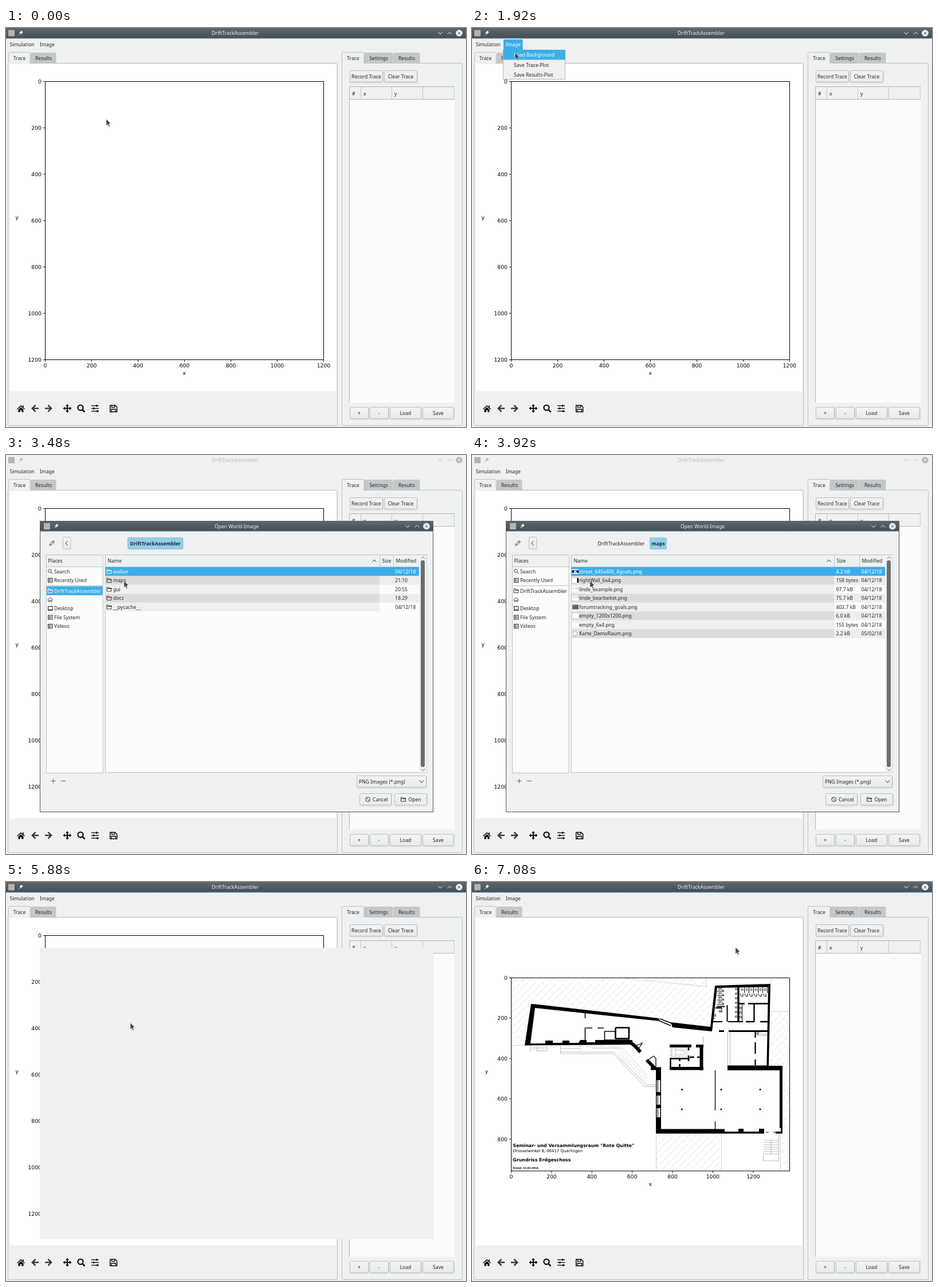
Animation of 803 by 697 pixels, one loop 8.12 s. Source, as an HTML page:

```html
<!DOCTYPE html>
<html lang="en">
<head>
<meta charset="utf-8">
<title>DriftTrackAssembler</title>
<style>
html, body { margin: 0; width: 100%; height: 100%; overflow: hidden; background: #eff0f1; }
svg { display: block; width: 803px; height: 697px; }
text { font: 8.6px "Noto Sans", "Open Sans", sans-serif; fill: #232629; white-space: pre; }
.plot text { font: 9.25px "DejaVu Sans", sans-serif; fill: #000; }
.plot .head { font: bold 7.83px "DejaVu Sans", sans-serif; }
.plot .addr { font-size: 6.95px; }
.plot .tiny { font: bold 4.3px "DejaVu Sans", sans-serif; }
</style>
</head>
<body>
<svg id="stage" viewBox="0 0 803 697" xmlns="http://www.w3.org/2000/svg"></svg>
<script>
const LOOP = 8120;
const APP = 'DriftTrackAssembler';
const BG = '#eff0f1', INK = '#232629', EDGE = '#bcc0c2', BLUE = '#3daee9', VIEW = '#fcfcfc';

const range = n => [...Array(n).keys()];
const rect = (x, y, w, h, fill, stroke = 'none', rx = 0) =>
  `<rect x="${x}" y="${y}" width="${w}" height="${h}" fill="${fill}" stroke="${stroke}" rx="${rx}"/>`;
const path = (d, stroke = INK, width = 1, fill = 'none', extra = '') =>
  `<path d="${d}" stroke="${stroke}" stroke-width="${width}" fill="${fill}" ${extra}/>`;
const solid = (d, fill = '#000') => path(d, 'none', 0, fill);
const disc = (x, y, r, fill, stroke = 'none', w = 1) =>
  `<circle cx="${x}" cy="${y}" r="${r}" fill="${fill}" stroke="${stroke}" stroke-width="${w}"/>`;
const text = (x, y, s, fill = '', anchor = 'start', extra = '') =>
  `<text x="${x}" y="${y}" text-anchor="${anchor}" ${fill && `style="fill:${fill}"`} ${extra}>${s}</text>`;
const group = (id, body, extra = '') => `<g id="${id}" ${extra}>${body}</g>`;

function button(x, y, w, h, label, fill = 'url(#btn)') {
  return rect(x + .5, y + 1, w, h, 'none', '#d3d5d7', 2) + rect(x + .5, y + .5, w - 1, h - 1, fill, '#b9bdbf', 2)
    + text(x + w / 2, y + h / 2 + 3, label, '', 'middle');
}

const chevron = (x, y, s, dy, color = INK) => path(`M${x - s} ${y - dy}L${x} ${y + dy}L${x + s} ${y - dy}`, color);

// Title bar contents; x and y are the top left corner of the window
function titleItems(x, y, w, label, color, hole, middle) {
  const r = x + w, m = y + 9;
  return rect(x + 4, y + 3.5, 11, 11, '#b8b3ae')
    + path(`M${x + 22} ${m + 3.5}l3-3`, color) + solid(`M${x + 23} ${m - 1.5}l2-.6 1.8-2.4 3 3-2.4 1.8-.6 2z`, color)
    + text(middle, y + 12.2, label, color, 'middle')
    + chevron(r - 45, m, 3.8, 2, color) + chevron(r - 28.5, m, 3.8, -2, color)
    + disc(r - 12, m, 5.8, color) + path(`M${r - 14.3} ${m - 2.3}l4.6 4.6m0-4.6l-4.6 4.6`, hole);
}
const titleBack = (x, y, w) => rect(x, y, w, 18, 'url(#title)') + rect(x, y + 17.5, w, 1, '#3b8fc0');

function tab(x, w, label, on) {
  const y = on ? 42.5 : 43.5;
  return path(`M${x + .5} 61.5V${y + 2}q0-2 2-2H${x + w - 2}q2 0 2 2V61.5`, on ? EDGE : '#c2c5c6', 1, on ? BG : '#c5c8c9')
    + text(x + w / 2 + .5, 55.5, label, '', 'middle');
}

function toolbar() {
  const dark = '#3b3b3b';
  let s = path('M19.6 665.8L26 660l6.4 5.8', '#000', 1.5) + rect(29, 659.5, 1.8, 3, '#000')
    + solid('M21.6 666.4L26 662.4l4.4 4v4.6h-3.1v-3.4h-2.6v3.4h-3.1z')
    + path('M51.5 658.8l-5.7 5.7 5.7 5.7M46 664.5h11', dark, 2.5)
    + path('M73.5 658.8l5.7 5.7-5.7 5.7M79 664.5H68', dark, 2.5)
    + path('M107 659v11M101 664.5h12', '#000', 1.8);
  for (const a of [0, 90, 180, 270])
    s += path('M107 657l3 3.5h-6z', 'none', 0, '#000', `transform="rotate(${a} 107 664.5)"`);
  s += disc(130, 663.3, 4.6, 'none', '#000', 2.1) + path('M133.3 666.7l4.2 4.2', '#000', 2.5);
  [[659.8, 157], [664.6, 152], [669.4, 158.5]].forEach(([y, k]) => {
    s += path(`M149 ${y}h13`, '#000', 1.3) + rect(k, y - 1.7, 2.2, 3.4, '#000');
  });
  return s + path('M181.7 659.2h9l3 3v8.3h-12z', '#000', 1.4) + path('M184.5 659v3.6h5.2V659M184 670v-4h7.5v4', '#000', 1.3);
}

function mainWindow() {
  let s = rect(0, 0, 803, 697, BG)
    + group('barActive', titleBack(0, 0, 803) + group('barItems', titleItems(0, 0, 803, APP, '#eff0f1', '#475057', 400)))
    + group('barIdle', titleItems(0, 0, 803, APP, '#b9bcbe', BG, 400))
    + text(6.5, 32, 'Simulation') + text(59, 32, 'Image')
    + rect(3.5, 61.5, 575, 633, BG, EDGE, 1) + rect(586.5, 61.5, 210, 633, BG, EDGE, 1)
    + tab(43, 44, 'Results') + tab(4, 38, 'Trace', true)
    + tab(625, 50, 'Settings') + tab(676, 46, 'Results') + tab(586, 39, 'Trace', true)
    + rect(4, 61, 38, 1.5, BG) + rect(587, 61, 37.5, 1.5, BG)
    + rect(7, 63, 569, 571.5, '#fff') + toolbar()
    + button(600, 74, 58, 21, 'Record Trace') + button(660, 74, 58, 21, 'Clear Trace')
    + rect(599.5, 102.5, 184, 552, VIEW) + rect(599.5, 102.5, 183.5, 22, BG)
    + path('M599.5 654V102.5H783M599.5 124.5H783', '#b0b4b6');
  for (const x of [619.5, 673.5, 727.5, 782.5]) s += path(`M${x} 103v21`, '#c2c5c7');
  s += text(604, 117.5, '#') + text(624, 117.5, 'x') + text(678, 117.5, 'y');
  [[600, 33, '+'], [635, 33, '-'], [670, 55, 'Load'], [727, 55, 'Save']].forEach(([x, w, l]) => s += button(x, 662, w, 21, l));
  return s;
}

function axes(top, height, scale, xMax, yMax, yLabelX) {
  const end = top + height;
  let s = rect(68.5, top, 486, height, 'none', '#000');
  for (let v = 0; v <= yMax; v += 200) {
    const y = top + v * scale;
    s += path(`M65 ${y}h3.5`, '#000', .9) + text(62, y + 3.4, v, '', 'end');
  }
  for (let v = 0; v <= xMax; v += 200) {
    const x = 68.5 + v * scale;
    s += path(`M${x} ${end}v3.5`, '#000', .9) + text(x, end + 13.4, v, '', 'middle');
  }
  return s + text(311.3, end + 26.4, 'x', '', 'middle') + text(yLabelX, top + height / 2 - 2.5, 'y', '', 'middle');
}

function floorPlan() {
  const gray = '#aaa', faint = '#d4d4d4';
  const line = (d, w = 1.6) => path(d, '#000', w);
  let s = solid('M69 168H409V182L327 172L420 182V253L327 238L107 213L95 285H69z', 'url(#hatch)')
    + solid('M521 226H554V505H538V440H543V323H518z', 'url(#hatch)') + solid('M321 440H435V505H321z', 'url(#hatch)')
    + path('M265 168L409 182.5V168M69 285.5H95M520 226.5H554M522 168V180M321.5 440V505M435.5 440V505M538.5 440V505', faint);
  // outer walls
  s += solid('M103 213L111 213.5L326 238L328 243L110 220L102 282H128V277H141V281H158V277H170V281H186L189 276H200V280H215V276H280V284L92 285.5z')
    + line('M326 242L347 251M328 239L349 247', 1.5)
    + solid('M347 245L416 253L424 181L521 178L518 321H542V439.500H321V324H330V431.500H537V329H446V320.500H514.500L517 183.500L428 185L419 261L350 254z')
    + rect(322.500, 346, 6, 21, '#fff') + rect(322.500, 373, 6, 16, '#fff') + rect(322.500, 395, 6, 16, '#fff')
    + line('M324.500 345V412', 1) + rect(441, 430, 98, 6, '#fff') + line('M441 437H535', 2)
    + [465, 501].map(x => rect(x, 431, 9, 8, '#000')).join('') + rect(510, 435, 20, 5, '#fff') + line('M513 437h5M526 437h5', 1);
  // left wing
  s += line('M197.500 228V238M197.500 254V278M199 255H210M219 255H230M231.500 261V276M231 261H250M231 276H275')
    + line('M250.500 254.500H274V274.500M250.500 254.500V274M250 273.500H275', 2.6)
    + path('M274 278L286 288L294 297', '#000', 6) + line('M283 287L297 281.500L291 291', 1.3)
    + path('M305 311L319 325', '#000', 6) + line('M306 312L317 304L321 308V324', 1.3) + line('M312 326H330', 5);
  // upper right block
  s += line('M465 183V244', 3.4) + line('M466 212.500H476M482 212.500H517M492.500 213V244M478 244H493M503 244H517', 2.4)
    + line('M419 244H437M447 244H473M427 217.500H441M445.500 215V244M425 220H436', 2)
    + line('M431 260.500H440M448 260.500H517', 2.8) + line('M494.500 262V272M494.500 280V300M494.500 310V320', 2.2)
    + path('M446.500 262V320M450.500 262V320M403.500 289V270M497 262v6h18v-6M497 262l18 6', gray, .9);
  for (const i of range(6)) {
    const x = 468 + i * 8;
    s += disc(x + 3.5, 188, 1.7, '#fff', '#000', .8) + line(`M${x + 7.5} 183V194M${x} 195q1 5 5 5v-5`, 1);
  }
  for (const i of range(4)) {
    const y = 187 + i * 7.6;
    s += disc(432, y, 1.6, '#fff', '#000', .8) + line(`M428 ${y + 4}H440M440 ${y + 3}q-5-1-5-5`, 1);
  }
  for (const i of range(7)) s += disc(461, 187 + i * 8, 1.5, '#fff', '#000', .8);
  for (const i of range(3)) s += disc(468.500, 220 + i * 8, 1.7, '#fff', '#000', .9);
  s += disc(424, 233, 1.7, '#fff', '#000', .9) + disc(433, 226, 1.5, '#fff', '#000', .9)
    + line('M471.500 214V243M420 238h4M436 220v8', 1) + disc(499, 265, 1.4, '#fff', '#000', .8);
  // core block
  s += rect(345, 284, 38, 5, '#000') + rect(391, 284, 13, 5, '#000') + rect(397.500, 284, 6, 45, '#000')
    + rect(345, 323, 59, 5.5, '#000') + line('M346.500 307V325M346 308.500H380M362.500 309V313M362.500 318V325M378 289V294M378 303V313M380 306H388M393 306H398', 2.6)
    + path('M347 291H375V305H347zM355 291V305M355 294H371V302H355M349 291V305', gray, .8);
  // hall
  s += line('M424.500 329V399M424.500 418V432', 1.3);
  for (const x of [366.500, 435, 503]) for (const y of [362.500, 397]) s += disc(x, y, 1.5, '#000');
  // stairs
  s += path('M102 286V296M113 288V295H131V287M106 290H131M154.500 286V300H247L301 357.500H321M154 297H248L304 354.500H321M154 291H190M208 290H262', gray, .8);
  for (const i of range(4)) s += path(`M${251 + i * 4} ${300 - i * 3}L${303 + i * 1.5} ${354 - i * 5}`, faint, .9);
  for (const i of range(5)) s += path(`M${104 + i * 5} 287V296M${160 + i * 20} 287H${172 + i * 20}`, faint, .8);
  for (const i of range(7)) s += path(`M509 ${451 + i * 4}H535`, gray, .8);
  s += path('M535.500 440V487H508.500V474M522 451V475', gray, .8);
  return s + text(71.500, 463, 'Seminar- und Versammlungsraum "Rote Quitte"', '', 'start', 'class="head"')
    + text(71.500, 471.500, 'Drosselwinkel 8, 00417 Quarlingen', '', 'start', 'class="addr"')
    + text(71.500, 487.500, 'Grundriss Erdgeschoss', '', 'start', 'class="head"')
    + text(71.500, 500.500, 'Stand: 15.02.2016', '', 'start', 'class="tiny"');
}

function popup() {
  return rect(55, 20, 33.500, 18, BLUE) + text(59, 32, 'Image', '#fff')
    + rect(54.500, 38.500, 108, 51, BG, '#b5b9bb')
    + group('hover', rect(54.500, 38, 108.500, 17.500, BLUE))
    + group('firstPlain', text(73, 50, 'Load Background')) + group('firstLit', text(73, 50, 'Load Background', '#fff'))
    + text(73, 67.500, 'Save Trace-Plot') + text(73, 85, 'Save Results-Plot');
}

const folder = (x, y, c) => path(`M${x + .5} ${y - 3.500}h3l1 1.500h4v5.500h-8zM${x + .5} ${y - 1}h8`, c, .9);

function thumb(kind, y) {
  let s = rect(175, y - 4, 11, 8, '#fff');
  if (kind === 0) s += rect(175, y - 2, 11, 4, '#000') + rect(178, y - 1, 4.500, 2.500, '#fff');
  if (kind === 1) s += rect(183.500, y - 4, 2.500, 8, '#000');
  if (kind === 2 || kind === 3) s += path(`M176 ${y - 1.500}l5 .8 4-2v4`, '#aaa', .8);
  if (kind === 4) s += rect(175, y - 4, 11, 8, '#6b6558') + rect(175, y - 3, 4, 3, '#8d7a55') + rect(180, y, 5, 3, '#4d5a75');
  if (kind === 7) s += path(`M177 ${y - 3.500}l7 1-1 6-6 .5z`, '#888', .8);
  return s;
}

const FOLDERS = [['walker', '', '04/12/18'], ['maps', '', '21:10'], ['gui', '', '20:55'], ['docs', '', '18:29'], ['__pycache__', '', '04/12/18']];
const FILES = [
  ['street_640x400_4goals.png', '4.2 kB'], ['rightWall_6x4.png', '158 bytes'], ['linde_example.png', '97.7 kB'],
  ['linde_bearbeitet.png', '75.7 kB'], ['forumtracking_goals.png', '403.7 kB'], ['empty_1200x1200.png', '6.0 kB'],
  ['empty_6x4.png', '155 bytes'], ['Karte_DemoRaum.png', '2.2 kB', '05/02/18']];

function listing(id, rows, inMaps, selected) {
  const col = inMaps ? 632.500 : 652.500;
  let s = text(177.500, 188.300, 'Name') + text(col + 4, 188.300, 'Size') + text(680.500, 188.300, 'Modified')
    + chevron(col - 9.500, 185, 3.500, -2) + path(`M${col} 175v20M676.500 175v20`, '#c2c5c7');
  rows.forEach(([name, size, date = '04/12/18'], i) => {
    const y = 195.800 + i * 15.5, on = i === selected, odd = i % 2, ink = on ? '#fff' : INK;
    s += on ? rect(173.500, y, 547.500, 15.5, odd ? '#31a3df' : BLUE)
      : rect(173.500, y, col - 173.500, 15.5, odd ? '#dcdcdc' : '#efefef') + rect(col, y, 721 - col, 15.5, odd ? '#ededed' : VIEW);
    s += inMaps ? thumb(i, y + 7.700) : folder(175.500, y + 7.700, ink);
    s += text(187, y + 10.700, name, ink) + text(635.500, y + 10.700, size, ink)
      + (inMaps || date.length > 5 ? text(679.500, y + 10.700, date, ink) : text(679, y + 10.700, date, ink));
  });
  return group(id, s);
}

function place(y, label, icon, ink = INK) {
  const art = icon === 'folder' ? folder(72.500, y, ink)
    : icon === 'find' ? disc(76.300, y - 1, 2.800, 'none', ink, .9) + path(`M78.300 ${y + 1}l3 3`, ink)
    : icon === 'home' ? path(`M72.500 ${y + .5}l4.500-4 4.500 4M74 ${y}v3.500h2v-2h2v2h2V${y}`, ink, .9)
    : rect(73.500, y - 3.500, 7.500, 7, 'none', ink) + (icon === 'desk' ? path(`M74 ${y + 2}h7`, ink) : path(`M75 ${y - 1}h4.500M75 ${y + 1}h4.500M75.500 ${y - 3}v6`, ink, .8));
  return art + text(84, y + 3.200, label, ink);
}

function dialog() {
  const r = 'url(#btn)';
  const bold = (x, s) => text(x, 157.500, s, '', 'middle', 'font-weight="bold" style="font-weight:bold"');
  let s = rect(59.500, 115.500, 686, 508, BG, '#50585e') + titleBack(59, 115, 687)
    + titleItems(62, 115.500, 684, 'Open World-Image', '#eff0f1', '#475057', 402.500)
    + path('M76 158l.8-3 5.500-5.500 2.200 2.200-5.500 5.500zM80.800 151l2.200 2.200', INK, .9)
    + rect(99.500, 143.500, 13.500, 21, r, '#b9bdbf', 2) + path('M107.500 150.500L104 154.200l3.500 3.700')
    + rect(70.500, 174.500, 98.500, 381, VIEW, EDGE) + rect(71, 175, 97.500, 20, BG) + path('M71 195.500H169', EDGE) + text(73.500, 188.300, 'Places')
    + rect(173.500, 174.500, 561, 380, VIEW, EDGE) + rect(174, 175, 547, 20, BG) + path('M174 195.500H721', EDGE)
    + rect(721, 175, 13.500, 379.500, BG) + rect(724, 184, 7, 361, '#6a6e71', 'none', 3)
    + chevron(728, 179.500, 3, -1.700, '#777') + chevron(728, 550, 3, 1.700, '#777')
    + place(203.300, 'Search', 'find') + place(218.800, 'Recently Used', 'list') + path('M72 228.500H168', '#b5b8ba')
    + group('homeOn', rect(71, 229.500, 97.500, 15.5, BLUE) + place(237.300, APP, 'folder', '#fff'))
    + group('homeOff', place(237.300, APP, 'folder'))
    + place(252.500, '', 'home') + place(268, 'Desktop', 'desk') + place(283.500, 'File System', 'list') + place(299, 'Videos', 'list')
    + path('M78.500 569.500h8M82.500 565.500v8M96 569.500h8', '#666')
    + button(612, 560, 122, 21, '') + text(616, 573.800, 'PNG Images (*.png)') + chevron(725.500, 570.500, 3.500, 2)
    + button(617, 591, 56, 21, '') + disc(631.700, 601.500, 4, 'none', INK, .9) + path('M629 598.700l5.500 5.500', INK, .9) + text(640, 604.800, 'Cancel')
    + button(678, 591, 57, 21, '') + group('openLit', rect(678.500, 591.500, 56, 20, '#93cee9', '#7db9d5', 2))
    + folder(689, 601.500, INK) + text(702.500, 604.800, 'Open')
    + group('crumbRoot', rect(212.500, 144.500, 96.500, 20, '#93cee9', '#8cc5df', 2) + bold(260.700, APP))
    + group('crumbMaps', text(260.500, 157.500, APP, '', 'middle') + rect(310.500, 144.500, 29, 20, '#93cee9', '#8cc5df', 2) + bold(325, 'maps'))
    + listing('root0', FOLDERS, false, 0) + listing('root1', FOLDERS, false, 1)
    + listing('maps0', FILES, true, 0) + listing('maps3', FILES, true, 3);
  return s;
}

const defs = `<defs>
  <linearGradient id="title" x2="0" y2="1"><stop stop-color="#5d676e"/><stop offset="1" stop-color="#454e55"/></linearGradient>
  <linearGradient id="btn" x2="0" y2="1"><stop stop-color="#f2f3f4"/><stop offset="1" stop-color="#e9eaeb"/></linearGradient>
  <pattern id="hatch" width="9" height="11" patternUnits="userSpaceOnUse" patternTransform="rotate(45)">
    <path d="M4.500 0V8" stroke="#dedede" stroke-width=".8"/></pattern>
  <clipPath id="ghost"><rect x="62" y="134" width="673" height="487"/></clipPath>
</defs>`;

const stage = document.getElementById('stage');
stage.innerHTML = defs + mainWindow()
  + group('emptyPlot', axes(93.500, 486, .405, 1200, 1200, 19.300), 'class="plot"')
  + group('planPlot', floorPlan() + axes(167.500, 337.300, .352, 1200, 800, 25.500), 'class="plot"')
  + group('popup', popup()) + group('dialog', dialog()) + group('blank', rect(59, 115, 687, 509, BG))
  + group('cursor', path('M1 1V12.500L3.500 10.500L5.500 14.500L7.300 13.600L5.500 9.700L8.600 8.600Z', '#fff', .5, '#43474b'));

const part = {};
stage.querySelectorAll('g[id]').forEach(g => part[g.id] = g);
const show = (id, on) => part[id].setAttribute('display', on ? 'inline' : 'none');

// Pointer jumps: time, x, y
const STOPS = [[1440, 67, 30], [1920, 74, 42], [2880, 78, 52], [3320, 195, 205], [3480, 205, 219], [4080, 205, 220],
  [4440, 206, 221], [4600, 219, 224], [4880, 216, 245], [6920, 450, 116], [7080, 459, 113]];

function pointer(t) {
  if (t < STOPS[0][0]) {
    const k = Math.max(0, Math.min(15, Math.floor((t - 440) / 40) + 1)) / 15;
    const e = k * k * (3 - 2 * k);
    return [174 - 100 * e, 158 - 85 * e];
  }
  return STOPS.filter(p => p[0] <= t).pop().slice(1);
}

function draw(t) {
  const within = (a, b) => t >= a && t < b;
  const idle = within(2720, 5720), lit = t >= 1920, inMaps = t >= 3920;
  show('barActive', !idle);
  show('barIdle', idle);
  part.barItems.setAttribute('opacity', within(5720, 5880) ? .65 : 1);
  show('emptyPlot', t < 6040);
  show('planPlot', t >= 6040);
  show('popup', within(1760, 2720));
  show('hover', lit);
  show('firstLit', lit);
  show('firstPlain', !lit);
  show('dialog', within(2520, 5720));
  part.dialog.setAttribute('opacity', t < 2720 ? .35 : 1);
  part.dialog.setAttribute('clip-path', t < 2720 ? 'url(#ghost)' : 'none');
  show('homeOn', !inMaps);
  show('homeOff', inMaps);
  show('crumbRoot', !inMaps);
  show('crumbMaps', inMaps);
  show('root0', t < 3800);
  show('root1', within(3800, 3920));
  show('maps0', within(3920, 5200));
  show('maps3', t >= 5200);
  show('openLit', t >= 5360);
  show('blank', within(5720, 6040));
  show('cursor', !within(3160, 3320));
  part.cursor.setAttribute('transform', `translate(${pointer(t)})`);
}

const start = performance.now();
function tick() {
  draw((performance.now() - start) % LOOP);
  requestAnimationFrame(tick);
}
tick();
</script>
</body>
</html>
```
